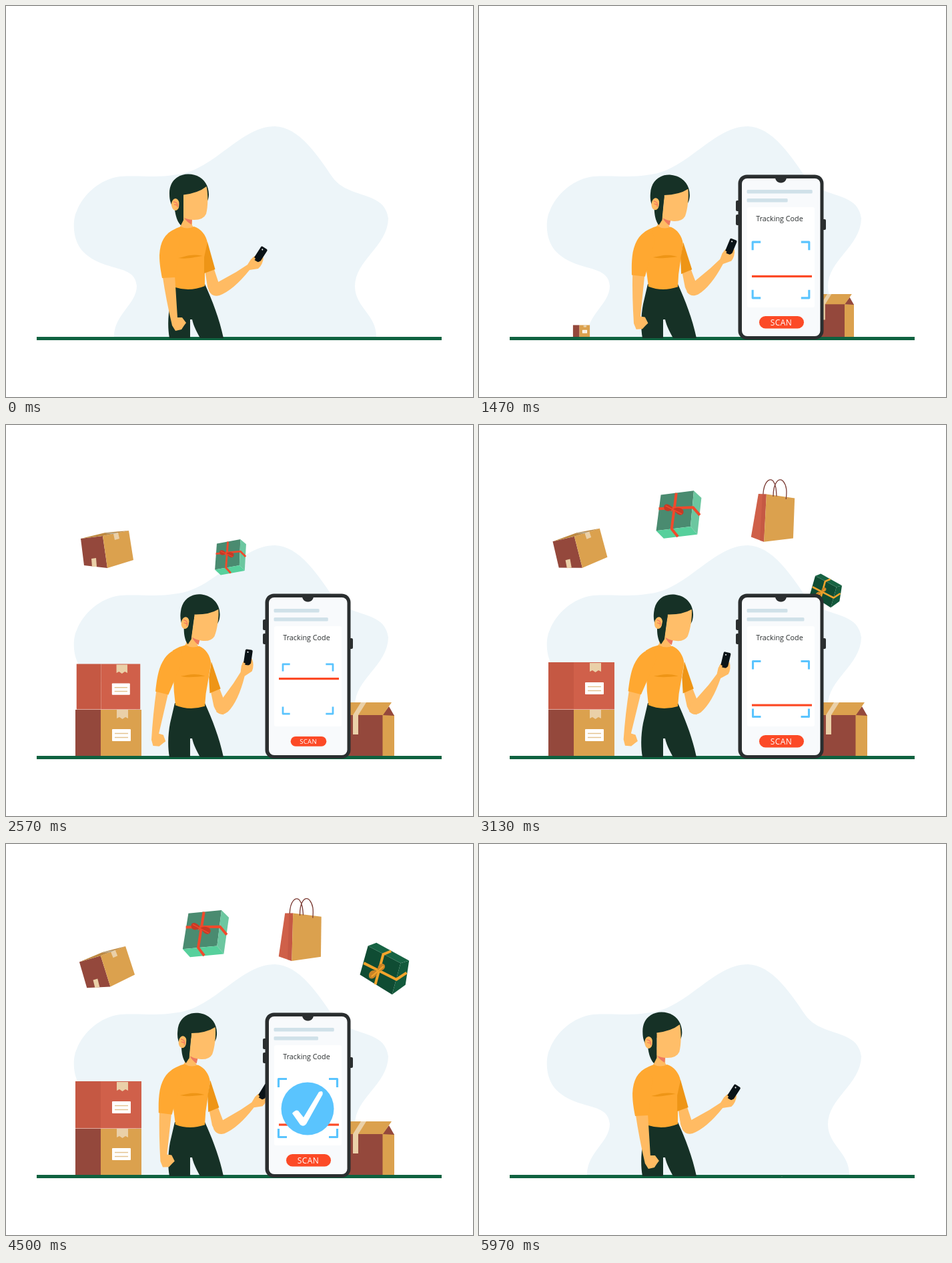
Recreate the animation shown at these times as an HTML page. Size 700 by 585 pixels, loop 6010 ms.

```html
<!DOCTYPE html>
<html lang="en">
<head>
<meta charset="utf-8">
<title>Parcel tracking</title>
<style>
  html, body { margin: 0; width: 100%; height: 100%; overflow: hidden; background: #fff; }
  svg { display: block; width: 100%; height: 100%; }
  text { font-family: "Open Sans", "Noto Sans", sans-serif; text-anchor: middle; }
  .skin { fill: #ffbb63; }
  .dark { fill: #163126; }
  .shirt { fill: #ffa831; }
  .fold { fill: #ee9516; }
  .brown { fill: #94483c; }
  .tan { fill: #dba14e; }
  .tape { fill: #ead0a8; }
  .red { fill: #fc4a26; }
  .case { fill: #2a2e2f; }
  .bar { fill: #d0e1e9; }
  .line { fill: none; stroke-linejoin: round; }
</style>
</head>
<body>
<svg viewBox="0 0 700 585">
  <defs>
    <g id="label">
      <path class="tape" d="M166 426h17v13l-4-2-4.500 3-4.500-3-4 2z"/>
      <rect x="159" y="455" width="28" height="18" rx="1" fill="#fff"/>
      <path class="line" stroke="#e3c391" stroke-width="1.600" d="M163 461.500h20M163 467.500h20"/>
    </g>
  </defs>

  <path fill="#edf5f9" d="M162 496C161 462 196 446 196 419C194 385 147 399 116 368C98 350 100 318 106 307C115 282 142 258 172 255C205 253 225 258 258 252C312 245 352 180 403 180C440 181 468 225 490 257C515 290 568 276 573 318C572 360 523 380 523 420C524 452 556 462 555 496Z"/>

  <g id="carton">
    <path class="brown" d="M112 170L145 166 152 214 117 210Z"/>
    <path class="tan" d="M145 166L184 158 191 202 152 214Z"/>
    <path fill="#bd8840" d="M112 170L149 161 184 158 145 166Z"/>
    <path fill="#b9ad95" d="M147 162L152 161 168 161 161 163Z"/>
    <path class="tape" d="M161 163L168 161 170 170 163 172ZM128 200L135 199 136 212 129 212Z"/>
  </g>

  <g id="mint">
    <path fill="#4a8b70" d="M271 106L320 97 318 151 267 160Z"/>
    <path fill="#6cc7a0" d="M320 97L332 107 329 162 318 151Z"/>
    <path fill="#57d09c" d="M267 160L318 151 329 162 279 171Z"/>
    <path class="line" stroke="#f04a2c" stroke-width="4" d="M294 102L290 156 300 167M269 127L320 122 331 133"/>
    <path fill="#c53a26" d="M291 126C284 117 275 118 277 126C280 132 286 130 291 126C298 121 309 125 306 132C302 138 295 133 291 126Z"/>
    <path class="line" stroke="#f04a2c" stroke-width="1.500" d="M279 122L304 133M288 130l3-7"/>
  </g>

  <g id="bag">
    <path fill="#cf6049" d="M420 102L432 103 425 174 406 166Z"/>
    <path fill="#b9503d" d="M426 103L432 103 425 174 419 172Z" opacity=".45"/>
    <path class="tan" d="M432 103L474 111 469 171 425 174Z"/>
    <path class="line" stroke="#7a3a33" stroke-width="1.300" d="M427 103C429 84 438 78 443 84C447 90 447 98 447 107M442 107C443 86 452 78 458 85C463 92 463 100 461 112"/>
  </g>

  <g id="pine">
    <path fill="#0f4c33" d="M545 151L592 180 576 226 530 193Z"/>
    <path fill="#176343" d="M545 151L558 147 605 177 592 180Z"/>
    <path fill="#135a3c" d="M592 180L605 177 597 213 576 226Z"/>
    <path class="line" stroke="#f2a42c" stroke-width="4" d="M579 161L567 165 552 209M537 176L584 204 600 195"/>
    <path fill="#c98326" d="M557 190C548 184 541 192 544 199C550 203 555 196 557 190C556 180 564 176 568 181C570 187 563 190 557 190Z"/>
    <path class="line" stroke="#f2a42c" stroke-width="2" d="M547 197l19-14"/>
  </g>

  <g id="lowBox">
    <path class="brown" d="M104 426h38v69h-38z"/>
    <path class="tan" d="M142 426h61v69h-61z"/>
    <use href="#label"/>
  </g>
  <g id="topBox">
    <path fill="#c55843" d="M104 355h38v70.500h-38z"/>
    <path fill="#d0604a" d="M142 355h61v70.500h-61z"/>
    <use href="#label" y="-70"/>
  </g>

  <g id="openBox">
    <path class="brown" d="M455 433h110v62h-110z"/>
    <path class="tan" d="M564.500 434h17.500v61h-17.500z"/>
    <path class="brown" d="M564 434L574 421 582 435Z"/>
    <path class="tan" d="M470 415H578L565 434H455Z"/>
    <path class="tape" d="M532 415h8L528 434v29h-8v-29Z"/>
  </g>

  <rect x="46" y="495" width="607" height="5" fill="#0f6240"/>

  <g id="person">
    <path class="dark" d="M253 416H298C309 440 320 468 326 497H291C285 486 281 478 279 469H276V497H245C242 480 243 462 246 446Z"/>
    <g id="torso">
      <path class="skin" d="M265 308H279V328L285 336H258L262 328Z"/>
      <g id="head">
        <path fill="#ee7a5e" d="M267 317L279 319 278 327Q271 323 267 317Z"/>
        <path class="dark" d="M245 282C244 262 258 251.500 273 251.500C292 251.500 304 265 304 282Q304 289 301 293L266 290V320L262 328C256 322 254 312 253 305C247 298 245 290 245 282Z"/>
        <path fill="#ffbe69" d="M266 282.500Q288 280 300.500 270C303 281 303 300 300 311Q296 320 282 320Q272 320 266 316Z"/>
        <ellipse class="skin" cx="254" cy="297" rx="6" ry="9"/>
        <path class="line" stroke="#f4805f" stroke-width="1.500" d="M251 293q7 0 6 8M252 297l5 1"/>
        <path class="dark" d="M260 284H266V320L262 328L259 308Z"/>
      </g>
      <path class="shirt" d="M262 330Q272 335 282 330C292 333 300 343 302 354L298 400V419Q275 428 254 421L250 400 243 340Q252 333 262 330Z"/>
      <path class="fold" d="M258 377C270 375 276 370 295 374C280 376 272 379 258 377Z"/>
      <g id="rightArm">
        <path class="skin" d="M298 394L311 391 319 415 316 433Q306 433 302 420Z"/>
        <g id="forearm">
          <path class="skin" d="M310 415L318 413 345 398 362 387 367 379 373 374 379 380 386 376Q385 387 378 393L365 395Q341 425 320 433Q309 436 304 426Z"/>
          <g transform="rotate(33 381.500 371.500)">
            <rect x="376" y="360" width="11" height="23.500" rx="2" fill="#0a1317"/>
            <circle cx="380" cy="364" r="1" fill="#fff"/>
          </g>
          <path class="skin" d="M366 382L371 375 374 378 371 382 378 383 383 381 378 391 367 391Z"/>
        </g>
        <path class="fold" d="M302 353L313.500 394 297 400 297 376Z"/>
      </g>
      <g id="leftArm">
        <path class="skin" d="M234.500 403L253 403 257 466 264 466 270 474 267 478 263 484 254 486 249 478Q240 440 234.500 403Z"/>
        <path class="shirt" d="M252 335C238 340 231 353 230 373C230 386 232 396 234 407L254 406 260 350Z"/>
      </g>
    </g>
  </g>

  <g id="phone">
    <g class="case">
      <rect x="385" y="291" width="8" height="16" rx="2"/>
      <rect x="385" y="312" width="8" height="16" rx="2"/>
      <rect x="512" y="319" width="8" height="16" rx="2"/>
    </g>
    <rect class="case" x="388.500" y="252.500" width="128" height="246.500" rx="13"/>
    <rect x="394" y="258" width="117.500" height="236" rx="8" fill="#f8fafc"/>
    <path class="case" d="M444 257H461C460 267 445 267 444 257Z"/>
    <rect id="bar1" class="bar" x="401.500" y="275" height="5.500" rx="1.500"/>
    <rect id="bar2" class="bar" x="401.500" y="288" height="5.500" rx="1.500"/>
    <rect x="402" y="301" width="101" height="150" rx="3" fill="#fff"/>
    <text x="450.500" y="322" font-size="10.800" fill="#2a2e2f">Tracking Code</text>
    <path id="corners" class="line" stroke="#5ac4fe" stroke-width="3.200" d="M408.500 364V351.500H421M484 351.500H496.500V364M496.500 426V438.500H484M421 438.500H408.500V426"/>
    <rect id="scanLine" class="red" x="409" y="-1.600" width="90" height="3.200"/>
    <circle id="disc" cx="452" cy="396" r="39.500" fill="#5ac4fe"/>
    <path id="tick" fill="#fff" d="M429 403Q434 397 438 399L446 409 469 371Q476 368 474.500 375L450 419Q446 424 441 420Z"/>
    <g id="button">
      <rect class="red" x="420" y="464" width="67" height="18.500" rx="9.250"/>
      <text x="453" y="478" font-size="12" letter-spacing=".4" fill="#fff">SCAN</text>
    </g>
  </g>
</svg>
<script>
const LOOP = 6010;
const TAU = Math.PI * 2;
const ORIGIN = [432, 362];
const el = id => document.getElementById(id);

// Eased value from [time, value] steps.
function key(t, steps) {
  if (t <= steps[0][0]) return steps[0][1];
  for (let i = 1; i < steps.length; i++) {
    const [t0, v0] = steps[i - 1], [t1, v1] = steps[i];
    if (t <= t1) {
      const p = (t - t0) / (t1 - t0);
      return v0 + (v1 - v0) * p * p * (3 - 2 * p);
    }
  }
  return steps[steps.length - 1][1];
}

const inOut = (t, a, b, c, d) => key(t, [[a, 0], [b, 1], [c, 1], [d, 0]]);

function place(id, s, x, y, turn = 0, dx = 0, dy = 0) {
  el(id).setAttribute("transform",
    `translate(${x + dx} ${y + dy}) rotate(${turn}) scale(${s}) translate(${-x} ${-y})`);
}

const turn = (id, angle, x, y) => place(id, 1, x, y, angle);

const parcels = [
  { id: "carton", x: 151, y: 186, start: 1900, swing: -16 },
  { id: "mint", x: 299, y: 133, start: 2180, swing: 8.5 },
  { id: "bag", x: 440, y: 128, start: 2480, swing: -7 },
  { id: "pine", x: 567, y: 187, start: 2770, swing: 0 }
];

function drawPerson(t) {
  const sway = Math.sin(Math.PI * t / LOOP);
  const drift = (1 - Math.cos(TAU * t / LOOP)) / 2;
  const lean = 4.9 * sway, upper = -8.1 * sway;
  const lift = key(t, [[700, 0], [2420, -25], [4800, 0]]);
  turn("torso", lean, 276, 420);
  place("head", 1, 270, 326, 3 * sway, 3 * sway, sway);
  turn("leftArm", 12.6 * drift, 247, 350);
  turn("rightArm", upper, 293, 350);
  turn("forearm", lift - lean - upper, 311, 424);
}

function drawPhone(t) {
  place("phone", inOut(t, 600, 1340, 5360, 5990), 454, 498);
  const wave = Math.cos(TAU * (t - 1000) / 4300);
  el("bar1").setAttribute("width", 82 + 21 * wave);
  el("bar2").setAttribute("width", 72 - 14 * wave);
  place("corners", key(t, [[970, 1], [2500, .85], [3500, 1]]), 452.5, 395);
  place("button", key(t, [[2250, 1], [2560, .8], [2880, 1]]), 453.5, 473.5);
  const scanY = key(t, [[1000, 423], [2250, 365], [3200, 420]]);
  el("scanLine").setAttribute("transform", `translate(0 ${scanY})`);
  place("disc", key(t, [[3370, 0], [3970, 1]]), 452, 396);
  place("tick", key(t, [[3520, 0], [4130, 1]]), 452, 396);
}

function drawParcels(t) {
  const swing = (1 - Math.cos(TAU * (t - 2570) / 2660)) / 2;
  for (const p of parcels) {
    const s = inOut(t, p.start, p.start + 600, 5240, 5690);
    const angle = p.swing ? p.swing * swing : -4 * Math.sin(Math.PI * (t - 3730) / 1500) ** 2;
    place(p.id, s, p.x, p.y, angle, (ORIGIN[0] - p.x) * (1 - s), (ORIGIN[1] - p.y) * (1 - s));
  }
}

function drawBoxes(t) {
  place("lowBox", inOut(t, 1240, 1940, 5660, 5960), 153.5, 495);
  place("topBox", inOut(t, 1950, 2650, 5400, 5760), 153.5, 425.5);
  place("openBox", key(t, [[1130, 0], [1320, 1.19], [1470, .8], [1620, 1.08],
    [1780, .96], [1960, 1], [5050, 1], [5230, .85], [5340, 1.12], [5540, 0]]), 482, 495);
}

function draw(t) {
  drawPerson(t);
  drawPhone(t);
  drawParcels(t);
  drawBoxes(t);
}

const begin = performance.now();
function tick() {
  draw((performance.now() - begin) % LOOP);
  requestAnimationFrame(tick);
}
tick();
</script>
</body>
</html>
```
